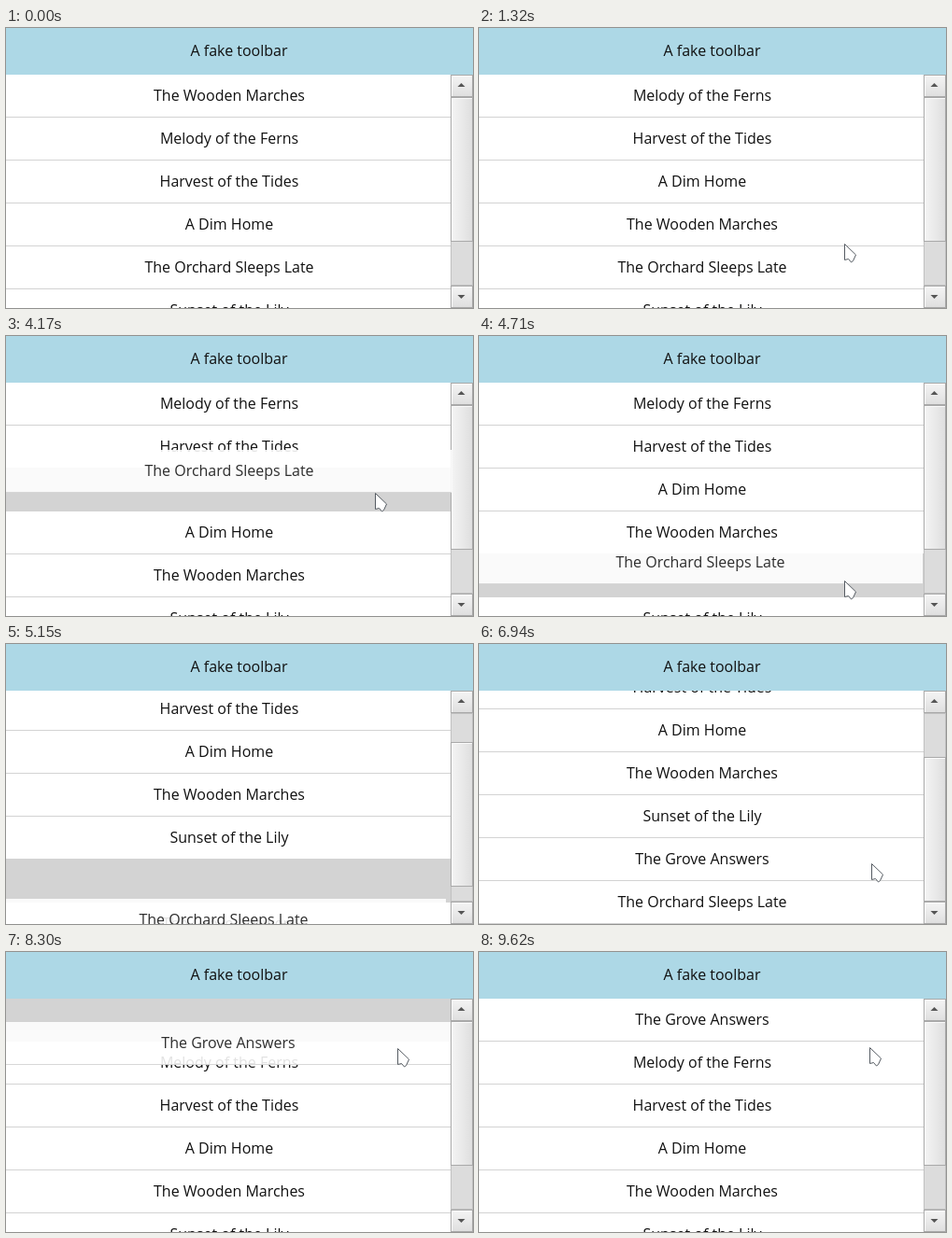
Recreate the animation shown at these times as an HTML page with a canvas. Size 500 by 300 pixels, loop 9720 ms.

```html
<!DOCTYPE html>
<html lang="en">
<head>
<meta charset="utf-8">
<title>Reorderable list</title>
<style>
html, body { margin: 0; width: 100%; height: 100%; overflow: hidden; background: #fff; }
canvas { display: block; }
</style>
</head>
<body>
<canvas width="500" height="300"></canvas>
<script>
const ctx = document.querySelector('canvas').getContext('2d');
const LOOP = 9720, TOP = 50, ROW = 46, VIEW = 250, LIST_W = 476, LAG = 40;
const GREY = '#d3d3d3', BORDER = '#a9a9a9', SCROLL_SPEED = .144;

const titles = [
  'The Wooden Marches', 'Melody of the Ferns', 'Harvest of the Tides', 'A Dim Home',
  'The Orchard Sleeps Late', 'Sunset of the Lily', 'The Grove Answers'
];

// Pointer moves: begin, end, x, y; it rests in between
const moves = [
  [250, 690, 391, 231], [1650, 1870, 391, 271],
  [2330, 2800, 391, 109], [3250, 3530, 406, 122], [3530, 3810, 391, 136],
  [4030, 4170, 395, 168], [4170, 4330, 393, 239], [4520, 5110, 388, 310],
  [6270, 6700, 420, 240], [6900, 6940, 420, 235],
  [6940, 7420, 420, 47], [7420, 7460, 420, 62], [7460, 7660, 419, 107],
  [8270, 8320, 419, 101], [9580, 9620, 418, 102]
];

// Each drag lifts row `from`; the gap travels like the pointer, -1 means no gap
const drags = [
  { from: 0, begin: 290, end: 1320, grab: [389, 29], gap: 1, steps: [[290, 650, 3]] },
  { from: 4, begin: 2360, end: 6050, grab: [394, 37], gap: -1,
    steps: [[2440, 2441, 3], [2441, 2560, 2], [4210, 4930, 5], [5520, 5560, 6]] },
  { from: 5, begin: 6980, end: 8590, grab: [420, 32], gap: -1,
    steps: [[7060, 7061, 4], [7061, 7300, 0]] }
];

const clamp = (v, lo, hi) => Math.min(hi, Math.max(lo, v));

// Runs through [begin, end, ...values] legs and rounds to whole numbers
function follow(from, legs, t) {
  let now = from;
  for (const [begin, end, ...to] of legs) {
    const p = clamp((t - begin) / (end - begin), 0, 1);
    now = now.map((v, i) => v + (to[i] - v) * p);
  }
  return now.map(Math.round);
}

const pointerAt = t => follow([389, 103], moves, t);

// Autoscroll down during the second drag, up during the third
function scrollAt(t) {
  return Math.round(t < 6980
    ? clamp((t - 4810) * SCROLL_SPEED, 0, 72)
    : clamp(26 - (t - 7287) * SCROLL_SPEED, 0, 26));
}

function listAt(t) {
  const rows = [...titles];
  let held = null;
  for (const d of drags) {
    if (t < d.begin) break;
    const [title] = rows.splice(d.from, 1);
    let [gap] = follow([d.gap], d.steps, t);
    const done = t >= d.end;
    if (!done) {
      const [x, y] = pointerAt(t - LAG);
      held = { title, x: x - d.grab[0], y: y - d.grab[1] };
      if (held.y + ROW / 2 < TOP) gap = -1;
    }
    if (gap >= 0) rows.splice(gap, 0, done ? title : null);
  }
  return { rows, held };
}

function rect(x, y, w, h, fill) {
  ctx.fillStyle = fill;
  ctx.fillRect(x, y, w, h);
}

function label(text, x, y) {
  ctx.fillStyle = '#111';
  ctx.fillText(text, x, y);
}

function polygon(points, fill, stroke) {
  ctx.beginPath();
  points.forEach(p => ctx.lineTo(...p));
  ctx.closePath();
  ctx.fillStyle = fill;
  ctx.fill();
  if (stroke) {
    ctx.strokeStyle = stroke;
    ctx.stroke();
  }
}

function drawRow(title, x, y, w = LIST_W) {
  rect(x, y, w, ROW, title ? '#fff' : GREY);
  if (!title) return;
  rect(x, y + ROW - 1, w, 1, GREY);
  label(title, x + 239, y + 28);
}

// Raised scrollbar part with a thin border
function bevel(y, h, vertical) {
  const g = vertical ? ctx.createLinearGradient(0, y, 0, y + h)
                     : ctx.createLinearGradient(LIST_W, 0, 500, 0);
  g.addColorStop(0, '#f5f5f5');
  g.addColorStop(1, '#dedede');
  rect(LIST_W, y, 24, h, BORDER);
  rect(LIST_W + 1, y + 1, 22, h - 2, '#fafafa');
  rect(LIST_W + 2, y + 2, 21, h - 3, g);
}

function arrow(y, dir) {
  polygon([[483.5, y], [491.5, y], [487.5, y + 4 * dir]], '#555');
}

function drawScrollbar(scroll, count) {
  const content = count * ROW, h = Math.round(200 * VIEW / content);
  const y = Math.floor(74 + (202 - h) * scroll / (content - VIEW));
  rect(LIST_W, TOP, 24, VIEW, '#c0c0c0');
  rect(LIST_W + 1, 75, 22, 200, '#dcdcdc');
  bevel(y, h, false);
  bevel(50, 24, true);
  bevel(276, 24, true);
  arrow(63, -1);
  arrow(286, 1);
}

function drawPointer(x, y) {
  const shape = [[.5, .5], [.5, 17.5], [4.5, 16.5], [7.5, 20], [9.5, 18.5], [12.5, 12]];
  polygon(shape.map(p => [x + p[0], y + p[1]]), '#fff', '#555b62');
}

function draw(t) {
  const { rows, held } = listAt(t);
  const scroll = scrollAt(t);
  rect(0, 0, 500, 300, '#fff');
  rows.forEach((title, i) => drawRow(title, 0, TOP + i * ROW - scroll));
  drawScrollbar(scroll, rows.length);
  rect(0, 0, 500, TOP, '#add8e6');
  label('A fake toolbar', 249.5, 30);
  if (held) {
    ctx.globalAlpha = .88;
    drawRow(held.title, held.x, held.y, LIST_W + 1);
    ctx.globalAlpha = 1;
  }
  if (t >= 290) drawPointer(...pointerAt(t));
}

ctx.font = '16px "Open Sans", "Noto Sans", sans-serif';
ctx.textAlign = 'center';
const start = performance.now();
function tick() {
  draw((performance.now() - start) % LOOP);
  requestAnimationFrame(tick);
}
tick();
</script>
</body>
</html>
```
